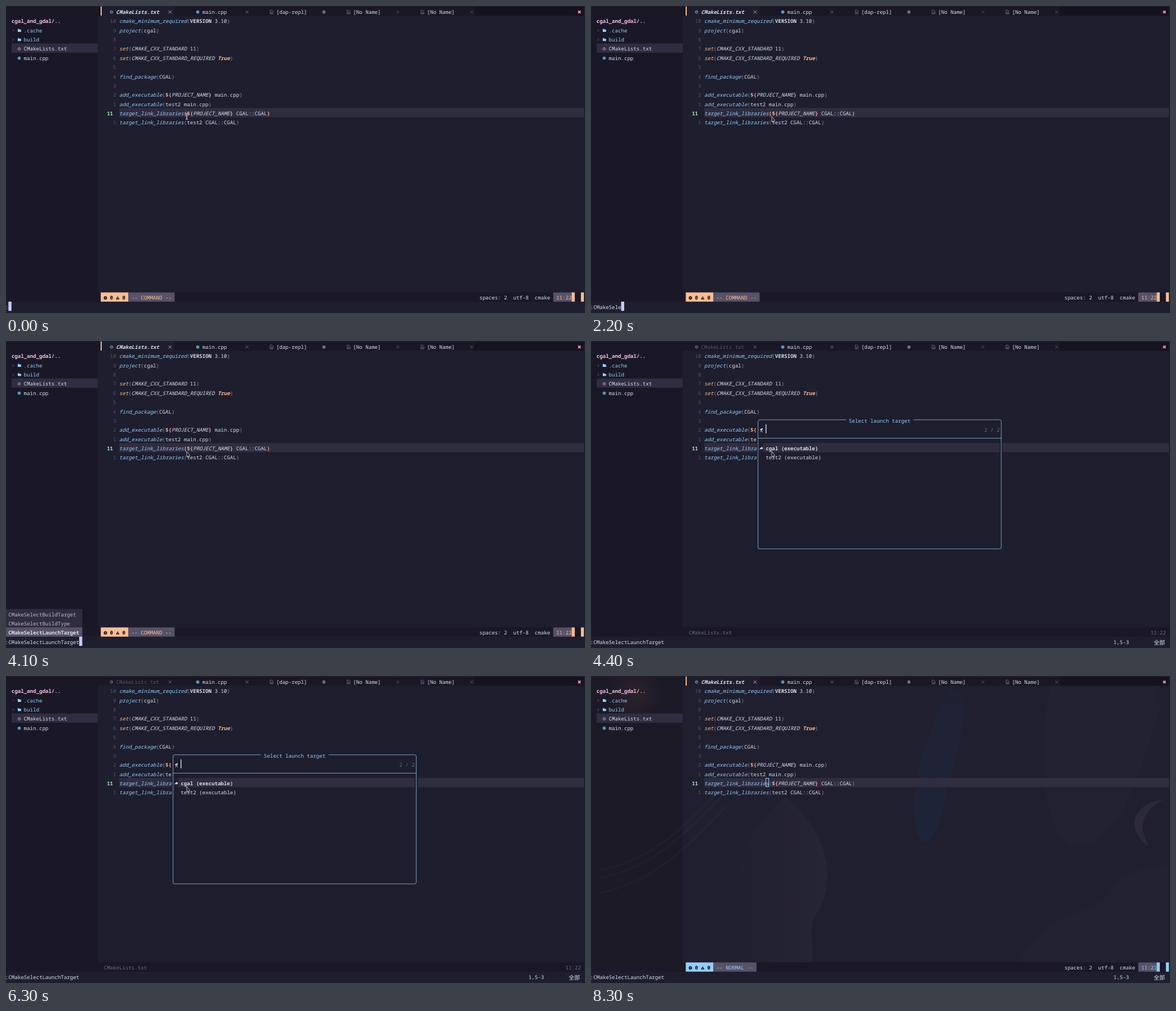
An HTML page with a canvas for the animation above (8.6 s loop, 1028 by 545 pixels).

```html
<!DOCTYPE html>
<html lang="en">
<head>
<meta charset="utf-8">
<title>Select launch target</title>
<style>
html, body { margin: 0; width: 100%; height: 100%; overflow: hidden; background: #1e1e2e; }
canvas { display: block; width: 1028px; height: 545px; }
</style>
</head>
<body>
<canvas id="stage"></canvas>
<script>
const W = 1028, H = 545, LOOP = 8600;
const canvas = document.getElementById('stage');
const ctx = canvas.getContext('2d');
const dpr = window.devicePixelRatio || 1;
canvas.width = W * dpr;
canvas.height = H * dpr;

// Terminal grid
const CW = 5.465, CH = 16.37;
const X = col => col * CW - 1.2;
const Y = row => row * CH + 1;
const FONT = '"Noto Sans Mono", "DejaVu Sans Mono", monospace';
const SIZE = CW / 0.6;

const C = {
  base: '#1e1e2e', side: '#1a1826', dark: '#161320', line: '#302d41', mid: '#575268',
  gray: '#6e6c7e', soft: '#988ba2', menu: '#c3bac6', white: '#d9e0ee', blue: '#96cdfb',
  peach: '#f8bd96', pink: '#f5c2e7', rose: '#f4a6b4', red: '#f28fad', green: '#abe9b3',
  caret: '#c9cbff', cpp: '#519aba'
};

// Syntax styles: [colour, font style]
const STYLE = {
  f: [C.blue, 'italic'], k: [C.peach, 'italic'], p: [C.soft, ''], t: [C.white, ''],
  b: [C.white, 'bold'], i: [C.white, 'italic'], c: [C.peach, 'italic bold'],
  d: [C.peach, 'bold'], r: [C.rose, 'bold'], m: [C.soft, '']
};
const VAR = [['d', '$'], ['r', '{'], ['i', 'PROJECT_NAME'], ['r', '}']];
const CODE = [
  [['f', 'cmake_minimum_required'], ['p', '('], ['b', 'VERSION'], ['t', ' 3.10'], ['p', ')']],
  [['f', 'project'], ['p', '('], ['t', 'cgal'], ['p', ')']],
  [],
  [['k', 'set'], ['p', '('], ['i', 'CMAKE_CXX_STANDARD'], ['t', ' 11'], ['p', ')']],
  [['k', 'set'], ['p', '('], ['i', 'CMAKE_CXX_STANDARD_REQUIRED'], ['c', ' True'], ['p', ')']],
  [],
  [['f', 'find_package'], ['p', '('], ['t', 'CGAL'], ['p', ')']],
  [],
  [['f', 'add_executable'], ['p', '('], ...VAR, ['t', ' main.cpp'], ['p', ')']],
  [['f', 'add_executable'], ['p', '('], ['t', 'test2 main.cpp'], ['p', ')']],
  [['f', 'target_link_libraries'], ['m', '('], ...VAR, ['t', ' CGAL::CGAL'], ['m', ')']],
  [['f', 'target_link_libraries'], ['p', '('], ['t', 'test2 CGAL::CGAL'], ['p', ')']]
];

const MENU = ['CMakeSelectBuildTarget', 'CMakeSelectBuildType', 'CMakeSelectLaunchTarget'];
const KEYS = [400, 700, 1000, 1200, 1300, 1800, 2000, 2100, 2200, 2800];
const PICKS = [5600, 5900, 6100, 6300, 6600];
const count = (times, t) => times.filter(v => t >= v).length;

function rect(x, y, w, h, color) {
  ctx.fillStyle = color;
  ctx.fillRect(x, y, w, h);
}
function cells(row, from, to, color) {
  rect(X(from), Y(row), X(to) - X(from), CH, color);
}
function text(row, col, str, color, style = '') {
  ctx.font = `${style} ${SIZE}px ${FONT}`;
  ctx.fillStyle = color;
  [...str].forEach((ch, i) => {
    if (ch !== ' ') ctx.fillText(ch, X(col + i), Y(row) + 13);
  });
}
function path(points, close) {
  ctx.beginPath();
  points.forEach(([x, y], i) => i ? ctx.lineTo(x, y) : ctx.moveTo(x, y));
  if (close) ctx.closePath();
}
function stroke(color, width = 1) {
  ctx.strokeStyle = color;
  ctx.lineWidth = width;
  ctx.stroke();
}
function fill(color) {
  ctx.fillStyle = color;
  ctx.fill();
}
function dot(x, y, r, color) {
  ctx.beginPath();
  ctx.arc(x, y, r, 0, 7);
  fill(color);
}

// Icons, placed by cell
const mid = (row, col) => [X(col) + 2.8, Y(row) + 9.7];
function gear(row, col, color) {
  const [x, y] = mid(row, col);
  ctx.beginPath();
  ctx.arc(x, y, 1.8, 0, 7);
  stroke(color, 1.2);
  ctx.setLineDash([1, 1.04]);
  ctx.beginPath();
  ctx.arc(x, y, 2.6, 0, Math.PI * 2);
  stroke(color, 1);
  ctx.setLineDash([]);
}
function cross(row, col, color, r = 2.6, width = 1) {
  const [x, y] = mid(row, col);
  ctx.beginPath();
  ctx.moveTo(x - r, y - r); ctx.lineTo(x + r, y + r);
  ctx.moveTo(x + r, y - r); ctx.lineTo(x - r, y + r);
  stroke(color, width);
}
function page(row, col, color) {
  const [x, y] = mid(row, col);
  path([[x - 2.5, y - 3.3], [x + 0.8, y - 3.3], [x + 2.6, y - 1.4], [x + 2.6, y + 3.3], [x - 2.5, y + 3.3]], true);
  stroke(color, 0.9);
  rect(x - 1.3, y - 0.2, 2.7, 0.8, color);
  rect(x - 1.3, y + 1.4, 2.7, 0.8, color);
}
function folder(row) {
  const [x, y] = mid(row, 4);
  path([[x - 2.6, y - 2.6], [x, y - 2.6], [x + 0.8, y - 1.6], [x + 3.4, y - 1.6], [x + 3.4, y + 2.5], [x - 2.6, y + 2.5]], true);
  fill(C.blue);
  path([[12, y - 2], [13.8, y], [12, y + 2]]);
  stroke(C.gray, 0.9);
}

function wallpaper(a) {
  ctx.save();
  ctx.globalAlpha = a;
  rect(0, 0, W, 525, 'rgba(48,40,52,.16)');
  const glow = ctx.createRadialGradient(78, 32, 2, 78, 32, 48);
  glow.addColorStop(0, 'rgba(90,65,45,.22)');
  glow.addColorStop(1, 'rgba(90,65,45,0)');
  rect(0, 0, 162, 90, glow);

  const body = ctx.createLinearGradient(240, 0, 425, 0);
  body.addColorStop(0, 'rgba(90,84,92,0)');
  body.addColorStop(1, 'rgba(90,84,92,.12)');
  ctx.beginPath();
  ctx.moveTo(345, 215);
  ctx.bezierCurveTo(425, 280, 440, 370, 395, 430);
  ctx.bezierCurveTo(385, 470, 400, 490, 390, 508);
  ctx.lineTo(235, 508);
  ctx.bezierCurveTo(260, 400, 240, 300, 345, 215);
  fill(body);

  const strip = ctx.createLinearGradient(0, 22, 0, 294);
  strip.addColorStop(0, 'rgba(24,50,86,.1)');
  strip.addColorStop(1, 'rgba(24,50,86,.26)');
  ctx.beginPath();
  ctx.moveTo(636, 22);
  ctx.bezierCurveTo(680, 30, 660, 110, 632, 200);
  ctx.bezierCurveTo(622, 260, 606, 300, 588, 294);
  ctx.bezierCurveTo(555, 240, 580, 140, 636, 22);
  fill(strip);

  ctx.beginPath();
  ctx.moveTo(815, 20);
  ctx.bezierCurveTo(790, 150, 805, 270, 850, 300);
  ctx.bezierCurveTo(930, 310, 960, 220, 1010, 60);
  ctx.lineTo(1000, 20);
  fill('rgba(90,80,86,.05)');

  ctx.beginPath();
  ctx.moveTo(1015, 220);
  ctx.bezierCurveTo(965, 225, 945, 270, 990, 302);
  ctx.bezierCurveTo(970, 265, 980, 240, 1015, 220);
  fill('rgba(130,120,120,.12)');

  ctx.beginPath();
  ctx.moveTo(760, 508);
  ctx.bezierCurveTo(810, 400, 900, 440, 930, 370);
  ctx.bezierCurveTo(980, 330, 1010, 350, 1026, 330);
  ctx.lineTo(1026, 508);
  fill('rgba(90,80,86,.05)');

  [0, 14, 40].forEach(d => {
    ctx.beginPath();
    ctx.moveTo(16, 345 + d);
    ctx.bezierCurveTo(90, 330 + d, 150, 290 + d, 240, 190 + d);
    stroke('rgba(150,140,140,.04)', 3);
  });
  ctx.restore();
}

function sidebar() {
  rect(10, Y(4), X(30) - 10, CH, C.line);
  text(1, 2, 'cgal_and_gdal/..', C.pink, 'bold');
  folder(2);
  text(2, 6, '.cache', C.blue);
  folder(3);
  text(3, 6, 'build', C.blue);
  gear(4, 4, C.soft);
  text(4, 6, 'CMakeLists.txt', C.white);
  dot(...mid(5, 4), 2.9, C.cpp);
  text(5, 6, 'main.cpp', C.white);
}

function tabs(active) {
  cells(0, 30, 152.5, C.side);
  cells(0, 152.5, 188, C.dark);
  if (active) {
    cells(0, 31, 55, C.base);
    rect(168, 1, 2, 16, C.peach);
  }
  gear(0, 34, active ? C.soft : C.gray);
  text(0, 36, 'CMakeLists.txt', active ? C.white : C.mid, active ? 'italic bold' : '');
  cross(0, 53, active ? C.red : C.gray);
  dot(...mid(0, 62), 2.9, C.cpp);
  text(0, 64, 'main.cpp', C.white);
  cross(0, 78, C.gray);
  page(0, 86, C.gray);
  text(0, 88, '[dap-repl]', C.white);
  dot(...mid(0, 103), 2.9, C.gray);
  [113, 137].forEach(col => {
    page(0, col - 2, C.gray);
    text(0, col, '[No Name]', C.white);
    cross(0, col + 14, C.mid);
  });
  cross(0, 186, C.red, 2.2, 2);
}

function code(matched) {
  cells(11, 37, 188, C.line);
  CODE.forEach((tokens, i) => {
    const row = i + 1, n = String(Math.abs(10 - i));
    if (i === 10) text(row, 33, '11', C.green, 'bold');
    else text(row, 36 - n.length, n, C.mid);
    let col = 37;
    tokens.forEach(([key, str]) => {
      const [color, style] = STYLE[key === 'm' && matched ? 'd' : key];
      text(row, col, str, color, style);
      col += str.length;
    });
  });
}

function status(mode, accent, place) {
  cells(31, 30, 188, C.side);
  if (!mode) {
    text(31, 32, 'CMakeLists.txt', C.gray);
    text(31, 182, '11:22', C.gray);
    return;
  }
  const label = `-- ${mode} --`;
  cells(31, 31, 40, accent);
  cells(31, 40, 42 + label.length, C.mid);
  const [x, y] = mid(31, 32);
  dot(x, y, 2.9, C.dark);
  dot(x, y, 1, accent);
  const [wx, wy] = mid(31, 36);
  path([[wx, wy - 3], [wx + 3.2, wy + 2.7], [wx - 3.2, wy + 2.7]], true);
  fill(C.dark);
  rect(wx - 0.4, wy - 0.8, 0.9, 2.2, accent);
  text(31, 34, '0', C.dark, 'bold');
  text(31, 38, '0', C.dark, 'bold');
  text(31, 41, label, accent);
  text(31, 154, 'spaces: 2', C.white);
  text(31, 165, 'utf-8', C.white);
  text(31, 172, 'cmake', C.white);
  cells(31, 178, 184, C.mid);
  text(31, 179, place, accent);
  cells(31, 184, 185, accent);
  cells(31, 187, 188, accent);
}

function commandLine(t) {
  if (t >= 4300) {
    text(32, 0, ':' + MENU[2], C.white);
    text(32, 170, '1,5-3', C.white);
    ctx.font = '10.2px "Noto Sans CJK SC", "Noto Sans CJK", sans-serif';
    ctx.fillText('全部', X(183), Y(32) + 13.8);
    return;
  }
  let str = MENU[2].slice(0, count(KEYS, t));
  if (t >= 3000) {
    const pick = count([3600, 4100], t);
    str = MENU[pick];
    rect(0, Y(29), X(25), CH * 3, C.line);
    MENU.forEach((item, i) => {
      const on = i === pick;
      if (on) rect(0, Y(29 + i), X(25), CH, C.mid);
      text(29 + i, 1, item, on ? C.white : C.menu, on ? 'bold' : '');
    });
  }
  text(32, 0, ':' + str, C.white);
  cells(32, str.length + 1, str.length + 2, C.caret);
}

function picker(t) {
  const pick = count(PICKS, t) % 2;
  rect(X(54), Y(8), X(134) - X(54), Y(23) - Y(8), C.base);
  const left = X(54.5), right = X(133.5), top = Y(8.5) - 0.3;
  ctx.beginPath();
  ctx.roundRect(left, top, right - left, 14 * CH, 3);
  stroke(C.blue, 0.75);
  path([[left, top + 2 * CH], [right, top + 2 * CH]]);
  stroke(C.blue, 0.75);
  rect(X(83), top - 1.5, X(105) - X(83), 3, C.base);
  text(8, 84, 'Select launch target', C.blue);

  // Prompt
  path([[300, 157], [304.5, 154.8], [305.3, 156.8], [300.8, 158.8]], true);
  fill(C.white);
  path([[301, 162], [302.8, 158], [304.6, 162]]);
  stroke(C.white, 0.8);
  rect(310, 148, 1.4, 16, C.white);
  text(9, 128, '2 / 2', C.gray);

  cells(11 + pick, 56, 133, C.line);
  ['cgal', 'test2'].forEach((name, i) =>
    text(11 + i, 57, `${name} (executable)`, C.white, i === pick ? 'bold' : ''));
  const y = Y(11 + pick) + 9.5;
  path([[299.6, y + 3], [299.8, y], [302.2, y - 1.2], [302.2, y - 3], [305.6, y - 0.2], [302.2, y + 2.4], [302.2, y + 0.8], [300.6, y + 1.2]], true);
  fill(C.white);
}

function pointer(t) {
  if (t < 700 || (t >= 1600 && t < 1800)) {
    path([[319, 190.5], [321, 191.5], [323, 190.5]]);
    stroke(C.white);
    path([[321, 191], [321, 201]]);
    stroke(C.white, 1.2);
    path([[319, 201.5], [321, 200.5], [323, 201.5]]);
    stroke(C.white);
  } else {
    path([[320.8, 196.2], [321.1, 206], [323.2, 204.2], [324.6, 206.8], [325.8, 206.1], [324.5, 203.7], [326.4, 203]], true);
    fill('#15141f');
    stroke('#e4e4ea', 0.8);
  }
}

function draw(t) {
  const inPicker = t >= 4400 && t < 6900;
  const command = t < 4300;
  const away = t >= 7700;

  ctx.setTransform(dpr, 0, 0, dpr, 0, 0);
  ctx.textRendering = 'geometricPrecision';
  rect(0, 0, W, H, C.base);
  rect(0, 0, X(30), Y(32), C.side);
  if (away) wallpaper(Math.min(7, Math.floor((t - 7700) / 100) + 1) / 7);

  tabs(!inPicker);
  sidebar();
  code(command);
  if (inPicker) status('');
  else if (command) status('COMMAND', C.peach, '11:22');
  else status('NORMAL', C.blue, '11:21');

  // Window margins
  rect(0, 0, W, 1, '#272225');
  rect(1026.3, 0, 2, H, '#1a1f2b');
  rect(0, 541.2, W, 4, '#1b2030');

  commandLine(t);
  if (inPicker) picker(t);
  else if (away) {
    ctx.strokeStyle = C.blue;
    ctx.lineWidth = 1;
    ctx.strokeRect(310.5, 181.5, 5, 15);
  } else if (!command) {
    cells(11, 57, 58, C.blue);
    text(11, 57, 's', C.base, 'italic');
  }
  if (!away) pointer(t);
}

const start = performance.now();
function tick() {
  draw((performance.now() - start) % LOOP);
  requestAnimationFrame(tick);
}
tick();
</script>
</body>
</html>
```
